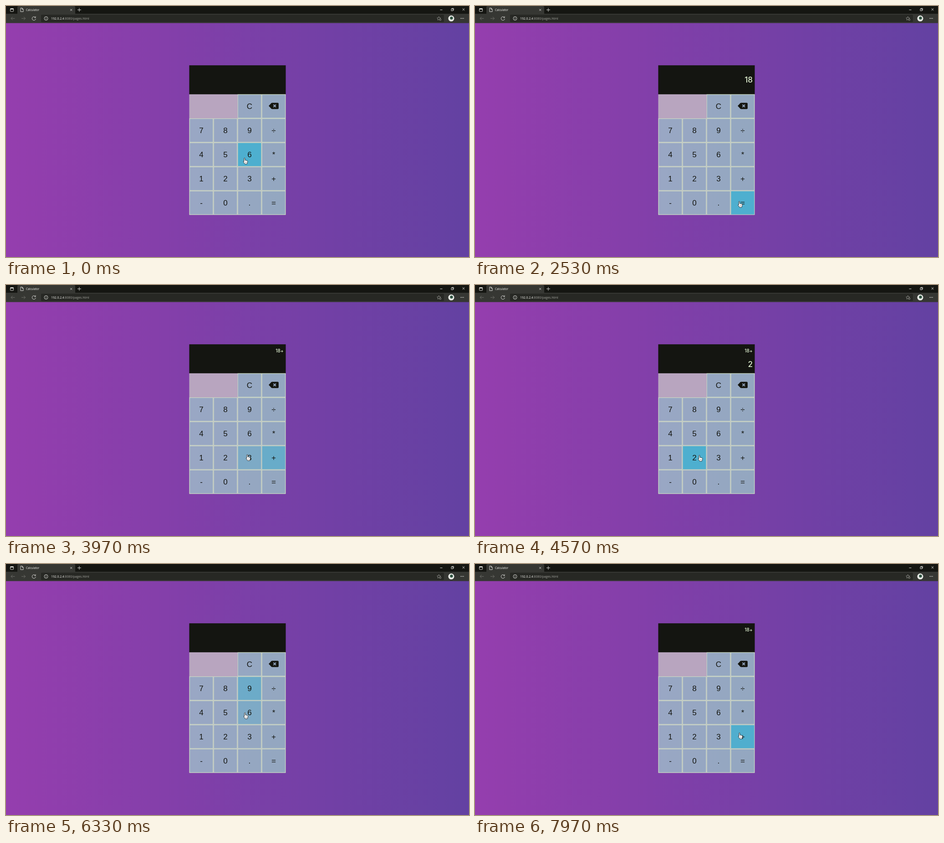
Animation of 1017x551 px, one loop 8 s. Source, as an HTML page:

```html
<!DOCTYPE html>
<html lang="en">
<head>
<meta charset="utf-8">
<title>Calculator</title>
<style>
  html, body { margin: 0; width: 100%; height: 100%; overflow: hidden; background: #7d3fa9; }
  svg { display: block; width: 100vw; height: 100vh; }
  .line { fill: none; stroke: #e6e6e2; stroke-width: .9; }
  .dim { stroke: #74746f; }
  .chrome { font-family: "Open Sans", "Noto Sans", sans-serif; fill: #f4f4f0; }
  .key { font: 17px "Liberation Sans", Arial, sans-serif; fill: #14150f; text-anchor: middle; }
  .out {
    font-family: Inter, sans-serif; font-weight: 500; fill: #e2f3d3; text-anchor: end;
    font-feature-settings: "cv03", "cv09", "calt" 0;
  }
</style>
</head>
<body>
<svg viewBox="0 0 1017 551" preserveAspectRatio="none">
  <defs>
    <linearGradient id="bg">
      <stop offset="0" stop-color="#953eae"/>
      <stop offset="1" stop-color="#6341a2"/>
    </linearGradient>
    <linearGradient id="face" gradientUnits="userSpaceOnUse" x1="402" y1="0" x2="615" y2="0">
      <stop offset="0" stop-color="#99a7c4"/>
      <stop offset="1" stop-color="#93a7c0"/>
    </linearGradient>
  </defs>

  <rect y="37" width="1017" height="514" fill="url(#bg)"/>

  <!-- browser bar -->
  <rect width="1017" height="18" fill="#151612"/>
  <path d="M25 18V3q0-3 3-3H149q3 0 3 3V18z" fill="#363733"/>
  <rect y="17" width="1017" height="20.5" fill="#363733"/>
  <rect x="77" y="19" width="885" height="16.5" rx="2" fill="#272824"/>
  <g class="line">
    <rect x="9.5" y="5.5" width="7" height="6.5" rx="1"/>
    <path d="M9.5 6.6h7" stroke-width="1.8"/>
    <path d="M32 4.5h3.5l2.5 2.5v5.5h-6zM35.3 4.5v2.7H38"/>
    <path d="M141.2 6.6l4 4m0-4l-4 4M161 4.5v8M157 8.5h8"/>
    <path d="M953.5 8.5h5M1002.7 5.3l4.6 4.6m0-4.6l-4.6 4.6"/>
    <path d="M978 6.5h4v4h-4zM979.3 6.4V5.2h4v4h-1.2"/>
    <path class="dim" d="M19.5 27.3h-8.5m3.5-3.5l-3.5 3.5l3.5 3.5M34 27.3h8.5m-3.5-3.5l3.5 3.5l-3.5 3.5"/>
    <path d="M64.7 25.3a4 4 0 1 0 .6 2.7M65 22.8v2.8h-2.8"/>
    <circle cx="88" cy="27.3" r="4"/>
    <path d="M88 26.8v2.6M88 24.8v1"/>
    <path d="M950.8 23.2l1.2 2.6l2.9.4l-2 2l.4 2.8l-2.5-1.3l-2.5 1.3l.5-2.8l-2-2l2.8-.4z" stroke="#a5a5a0" stroke-width=".8"/>
    <circle cx="954" cy="30" r="1.8" fill="#272824" stroke="#a5a5a0" stroke-width=".8"/>
    <path d="M998.6 27.3h7" stroke-width="1.4" stroke-dasharray="1.4"/>
  </g>
  <circle cx="978" cy="27.3" r="6.5" fill="#e9ece7"/>
  <circle cx="978.5" cy="26.5" r="3.2" fill="#2f5240"/>
  <text class="chrome" x="44" y="10.6" font-size="6.2">Calculator</text>
  <text class="chrome" x="99" y="29.7" font-size="6.8">192.0.2.4<tspan fill="#a3a39e">:8080/pages.html</tspan></text>

  <!-- calculator -->
  <rect x="402.5" y="130.2" width="212" height="63.8" fill="#141511"/>
  <rect x="402.5" y="193.8" width="106" height="53" fill="#b8a5bf"/>
  <g id="keys"></g>
  <path d="M577 219.3l5.8-6.1q.8-.8 1.8-.8h12.2q2 0 2 2v9.8q0 2-2 2h-12.2q-1 0-1.8-.8z" fill="#14150f"/>
  <path d="M587.4 216.5l5.6 5.6m0-5.6l-5.6 5.6" stroke="#94a7c1" stroke-width="2"/>
  <text id="small" class="out" x="609.8" y="148.3" font-size="10.2"></text>
  <text id="big" class="out" x="610" font-size="17"></text>

  <g id="hand">
    <path d="M-1.2 .8q0-1.2 1.1-1.2t1.1 1.2v3.7l4.5.9q1.5.4 1.3 1.9l-.7 3.4l-.9 2.2h-4.5l-3.3-4.6q-.5-1.1.5-1.3l.9.6z"
      fill="#fff" stroke="#111" stroke-width=".8" stroke-linejoin="round"/>
    <path d="M1.2 8v2.6M2.8 8v2.6M4.4 8v2.6" stroke="#333" stroke-width=".4"/>
  </g>
  <path id="arrow" d="M0 0v9l2.1-1.9l1.4 3.1l1.5-.7l-1.4-3h2.8z" fill="#fff" stroke="#111" stroke-width=".7"/>
</svg>

<script>
const LOOP = 8000, FADE = 160, LAG = 45;
const SIZE = 52.97, LEFT = 402.55, TOP = 193.7;
const SVG = "http://www.w3.org/2000/svg";
const el = id => document.getElementById(id);

// where the pointer rests on each key; low and high lie in the gap between columns
const spots = {
  "6": [524, 334], "*": [572, 332], "3": [549, 374], "=": [585, 432], "2": [493, 374],
  "+": [581, 371], "C": [537, 222], low: [561.5, 424], high: [561.5, 372]
};

// spot, arrival and departure; a stay presses the key halfway, a pass has no departure
const visits = [
  ["6", 0, 450], ["*", 780, 960], ["3", 1200, 1770], ["=", 2200, 2420],
  ["2", 3250], ["+", 3466, 3750], ["2", 4150, 4700], ["low", 5000, 5470],
  ["high", 5670], ["C", 5860, 5950], ["6", 6400, 6680], ["*", 6860, 7100],
  ["3", 7280, 7380], ["=", 7540, 7640], ["3", 7730], ["+", 7830, 8110]
].map(([spot, from, to = from]) => ({ spot, from, to, press: to > from ? (from + to) / 2 : Infinity }));

function add(name, attrs, text) {
  const node = document.createElementNS(SVG, name);
  for (const k in attrs) node.setAttribute(k, attrs[k]);
  if (text) node.textContent = text;
  el("keys").append(node);
  return node;
}

function square(x, y, inset, attrs) {
  const side = SIZE - 2 * inset;
  return add("rect", { x: x + inset, y: y + inset, width: side, height: side, ...attrs });
}

const keys = [];
["  C<", "789÷", "456*", "123+", "-0.="].forEach((row, r) => [...row].forEach((label, c) => {
  if (label === " ") return;
  const x = LEFT + c * SIZE, y = TOP + r * SIZE;
  square(x, y, .55, { fill: "url(#face)", stroke: "#d9edc9", "stroke-width": 1.1 });
  const glow = square(x, y, 1.1, { fill: "#4eafcf" });
  if (label !== "<") add("text", { x: x + SIZE / 2, y: y + 32.3, class: "key" }, label);
  keys.push({ x, y, glow });
}));

function pointer(t) {
  const i = Math.max(0, visits.findLastIndex(v => v.from <= t));
  const here = visits[i], next = visits[i + 1], a = spots[here.spot];
  if (t <= here.to || !next) return a;
  const b = spots[next.spot];
  const p = (t - here.to) / (next.from - here.to), ease = p * p * (3 - 2 * p);
  return a.map((v, k) => v + (b[k] - v) * ease);
}

const math = { "*": (a, b) => a * b, "+": (a, b) => a + b };

// press every key reached so far, starting from an empty display
function calculate(t) {
  let small = "", big = "";
  for (const { spot, press } of visits) {
    if (press > t) continue;
    if (spot === "C") small = big = "";
    else if (spot === "=") {
      big = String(math[small.slice(-1)](parseFloat(small), Number(big)));
      small = "";
    } else if (spot in math) {
      small = big + spot;
      big = "";
    } else if (/^\d$/.test(spot)) big += spot;
  }
  return { small, big };
}

function over(key, [x, y]) {
  const inside = d => d > .6 && d < SIZE - .6;
  return inside(x - key.x) && inside(y - key.y);
}

// replay the recent pointer path so the hover fades depend on time alone
function glowLevels(t) {
  const levels = keys.map(() => 0), step = 5;
  for (let s = t - 500; s <= t; s += step) {
    const pos = pointer(s - LAG);
    keys.forEach((key, i) => {
      const change = over(key, pos) ? step : -step;
      levels[i] = Math.min(1, Math.max(0, levels[i] + change / FADE));
    });
  }
  return levels;
}

function draw(t) {
  const pos = pointer(t), { small, big } = calculate(t);
  glowLevels(t).forEach((v, i) => keys[i].glow.setAttribute("opacity", v));

  el("small").textContent = small;
  el("big").textContent = big;
  el("big").setAttribute("y", small ? 179.5 : 167.7);

  const onKey = keys.some(key => over(key, pos));
  for (const [id, shown] of [["hand", onKey], ["arrow", !onKey]]) {
    el(id).setAttribute("transform", `translate(${pos})`);
    el(id).setAttribute("visibility", shown ? "visible" : "hidden");
  }
}

const start = performance.now();
function tick() {
  draw((performance.now() - start) % LOOP);
  requestAnimationFrame(tick);
}
tick();
</script>
</body>
</html>
```
